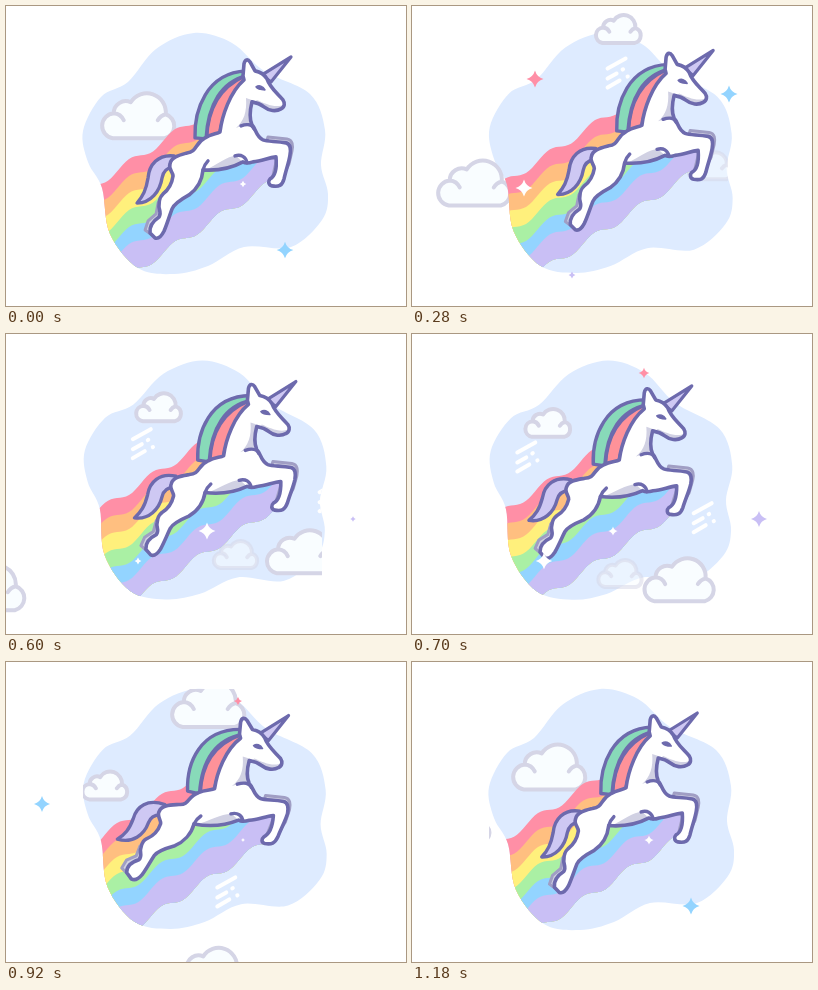
An HTML page with a canvas for the animation above (1200 ms loop, 400 by 300 pixels).

```html
<!DOCTYPE html>
<html lang="en">
<head>
<meta charset="utf-8">
<title>Unicorn</title>
<style>
html, body { margin: 0; width: 100%; height: 100%; overflow: hidden; background: #fff; }
canvas { display: block; width: 400px; height: 300px; }
</style>
</head>
<body>
<canvas id="stage"></canvas>
<script>
const LOOP = 1200, TAU = Math.PI * 2;
const canvas = document.getElementById('stage');
const dpr = window.devicePixelRatio || 1;
canvas.width = 400 * dpr;
canvas.height = 300 * dpr;
const c = canvas.getContext('2d');

const INK = '#6d6aad', SHADE = '#d1d1e3', LILAC = '#cec8f3';
const PINK = '#ff8fa6', BLUE = '#93d4ff', PURPLE = '#c9bff5', WHITE = '#fff';
const RAINBOW = [PINK, '#ffbf80', '#fff07c', '#aaf0a4', BLUE, PURPLE];

const BLOB = [
  [188, 27], [150, 43], [122, 76], [95, 91], [77, 125], [82, 156], [96, 182],
  [104, 228], [132, 262], [168, 268], [202, 260], [238, 241], [285, 241], [316, 214],
  [322, 188], [315, 159], [319, 124], [304, 88], [258, 65], [226, 37]
];

const SHAPE = {
  rainbowEnd: 'M-60 90 L196 104 L225 140 L277 150 L270 182 L275 320 L-60 320 Z',
  tail: 'M168 150 C152 148 143 159 142 172 C140 184 137 190 131 197 C145 197 154 185 156 172 C157 166 161 162 167 161 Z',
  green: 'M189 132 C188 105 200 67 240 65 L240 70 C216 76 202 98 200 133 Z',
  pink: 'M201 133 C202 104 214 82 238 71 L238 80 C226 90 217 105 213 129 Z',
  orange: 'M210 131 C212 112 221 92 238 79 L234 100 L222 128 Z',
  horn: 'M256 69 L285 51 L265 76 Z',
  body: 'M237 70 L238 58 C239 53 242 53 244 56 L249 65 C254 66 258 68 261 73 C264 82 271 87 277 94 ' +
    'C279 97 279 101 275 103 C270 106 263 105 258 101 C254 98 251 97 246 96 C244 104 243 112 246 119 ' +
    'C250 123 250 131 257 134 C262 136 270 135 280 137 C285 138 285 143 284 149 C283 156 280 164 278 173 ' +
    'C276 180 273 181 266 180 C262 179 262 175 264 173 C270 170 271 162 270 151 C262 152 256 155 247 156 ' +
    'C244 157 240 158 237 156 C226 162 212 165 197 164 C196 175 190 184 183 189 C174 194 168 198 166 203 ' +
    'C163 211 161 218 158 225 C155 231 152 233 149 232 L144 227 C143 220 147 215 153 211 ' +
    'C156 206 152 203 153 199 C153 192 155 190 157 188 C162 184 166 177 167 170 C167 166 162 163 164 158 ' +
    'C165 151 174 149 181 147 C191 146 189 137 199 132 C205 128 211 128 214 126 C216 110 224 86 238 74 Z',
  neckShade: 'M249 95 L240 92 C241 106 238 115 230 122 C237 119 244 118 250 124 Z',
  bellyShade: 'M238 157 C226 163 212 166 198 165 C212 158 221 150 230 150 Z',
  jawShade: 'M280 98 C270 103 260 98 251 94 L246 98 L262 107 L278 106 Z',
  lines: 'M229 150 C235 148 240 151 241 157 M197 164 C198 160 200 157 202 155 M235 120 C240 118 246 118 248 123',
  eye: 'M250 81 C253 79 257 80 259 84 C256 84 252 84 250 81 Z',
  farFront: 'M262 131 L281 133 C287 134 287 140 286 145 L283 158 L276 172 L266 174 L271 152 L256 152 Z',
  farHind: 'M159 188 L152 197 L150 208 L142 215 L139 224 L146 229 L157 215 Z'
};

const CLOUD = new Path2D('M14 50 L66 50 A12.5 12.5 0 0 0 67 26 A19 19 0 0 0 32 14 A12 12 0 0 0 15 25 ' +
  'A12.6 12.6 0 0 0 14 50 Z M15 25 A12 12 0 0 1 25 32 M67 26 A13 13 0 0 0 59 32');
const DASHES = new Path2D('M-9 -7 L9 -17 M-9 3 L0 -2 M6 -6 L6.5 -6.3 M-9 12 L3 5 M11 1 L11.2 .9');

// Each cloud passes its lower left corner (x, y) at time "at" and shows within a box
const CLOUDS = [
  { x: 93, y: 134, vx: -.25, vy: .24, size: 1, at: 1200, from: 690, box: [-90, 27, 500, 280] },
  { x: 258, y: 241, vx: -.285, vy: .28, size: .96, at: 600, from: 300, box: [0, 0, 316, 300] },
  { x: 182, y: 38, vx: -.168, vy: .157, size: .62, at: 280, from: 0, box: [77, 0, 323, 300] },
  { x: 206, y: 235, vx: -.215, vy: .19, size: .6, at: 600, from: 100, box: [0, 0, 316, 263], alpha: .5 }
];

// x, y, time of full size, colour
const SPARKS = [
  [237, 178, 1070, WHITE], [279, 244, 1180, BLUE], [123, 73, 270, PINK], [112, 182, 280, WHITE],
  [317, 88, 280, BLUE], [160, 269, 410, PURPLE], [201, 197, 590, WHITE], [347, 185, 740, PURPLE],
  [132, 227, 730, WHITE], [232, 39, 800, PINK], [36, 142, 960, BLUE]
];

// The leap is two harmonics: drift of the whole body, and the swing of its rear
const wave = (a, mean, s1, c1, s2, c2) =>
  mean + s1 * Math.sin(a) + c1 * Math.cos(a) + s2 * Math.sin(2 * a) + c2 * Math.cos(2 * a);

function poser(t) {
  const a = TAU * t / LOOP;
  const dx = wave(a, 4.8, 10.7, -2.5, -6.5, -2.3);
  const dy = wave(a, -2, -5, 1.7, 2, .2);
  const swing = wave(a, .5, -.53, -.275, -.275, -.225);
  const bend = (x, y) => {
    const rear = Math.max(0, (250 - x) / 110), low = Math.max(0, (y - 150) / 80);
    return [x + dx - swing * (7 * rear + 10 * low), y + dy - swing * (14 * rear * rear + 2 * low)]
      .map(v => v.toFixed(2)).join(' ');
  };
  return name => new Path2D(SHAPE[name].replace(/(-?[\d.]+) (-?[\d.]+)/g, (m, x, y) => bend(+x, +y)));
}

function paint(path, fill, stroke, width) {
  if (fill) { c.fillStyle = fill; c.fill(path); }
  if (stroke) { c.strokeStyle = stroke; c.lineWidth = width; c.stroke(path); }
}

// The blob rocks a few degrees and back
function blobPath(t) {
  const turn = .035 * (1 - Math.cos(TAU * t / LOOP)), n = BLOB.length;
  const sin = Math.sin(turn), cos = Math.cos(turn);
  const at = i => {
    const x = BLOB[(i + n) % n][0] - 200, y = BLOB[(i + n) % n][1] - 147;
    return [200 + x * cos - y * sin, 147 + x * sin + y * cos];
  };
  const path = new Path2D();
  path.moveTo(...at(0));
  for (let i = 0; i < n; i++) {
    const [p, q, r, s] = [at(i - 1), at(i), at(i + 1), at(i + 2)];
    path.bezierCurveTo(q[0] + (r[0] - p[0]) / 6, q[1] + (r[1] - p[1]) / 6,
      r[0] - (s[0] - q[0]) / 6, r[1] - (s[1] - q[1]) / 6, ...r);
  }
  return path;
}

function drawCloud({ x, y, vx, vy, size, at, from, box, alpha = 1 }, t) {
  const age = (t < from ? t + LOOP : t) - at;
  c.save();
  c.beginPath();
  c.rect(...box);
  c.clip();
  c.globalAlpha = alpha;
  c.translate(x + vx * age, y + vy * age);
  c.scale(size, size);
  c.translate(0, -52);
  paint(CLOUD, '#f9fdff', '#d5d5e6', 4 / size);
  c.restore();
}

function drawDashes(x, y) {
  c.save();
  c.translate(x, y);
  paint(DASHES, null, WHITE, 4);
  c.restore();
}

function drawRainbow(t, end) {
  const edge = x => 139.5 - .65 * (x - 150) + 4 * Math.sin(TAU * (x / 45 + 3 * t / LOOP));
  c.save();
  c.clip(end);
  RAINBOW.forEach((color, i) => {
    c.beginPath();
    for (let x = 60; x <= 320; x += 3) c.lineTo(x, edge(x) + i * 17);
    for (let x = 320; x >= 60; x -= 3) c.lineTo(x, edge(x) + 112);
    c.fillStyle = color;
    c.fill();
  });
  c.restore();
}

function drawUnicorn(posed) {
  paint(posed('farFront'), SHADE, '#a09ec4', 3);
  paint(posed('farHind'), SHADE, '#a09ec4', 3);
  paint(posed('tail'), LILAC, INK, 3.4);
  paint(posed('orange'), '#fec983', INK, 2.4);
  paint(posed('pink'), '#fe9299', INK, 2.6);
  paint(posed('green'), '#88dab9', INK, 3.4);
  paint(posed('horn'), LILAC, INK, 3.2);
  const body = posed('body');
  paint(body, WHITE);
  c.save();
  c.clip(body);
  for (const part of ['neckShade', 'bellyShade', 'jawShade']) paint(posed(part), SHADE);
  c.restore();
  paint(body, null, INK, 3.6);
  paint(posed('lines'), null, INK, 3.4);
  paint(posed('eye'), INK, INK, 1.5);
}

function drawSpark([x, y, peak, color], t) {
  const gap = Math.abs(t - peak), d = Math.min(gap, LOOP - gap), life = 175;
  if (d >= life) return;
  const r = 8.5 * Math.cos(d / life * Math.PI / 2), q = r * .22;
  c.beginPath();
  c.moveTo(x, y - r);
  c.quadraticCurveTo(x + q, y - q, x + r, y);
  c.quadraticCurveTo(x + q, y + q, x, y + r);
  c.quadraticCurveTo(x - q, y + q, x - r, y);
  c.quadraticCurveTo(x - q, y - q, x, y - r);
  c.fillStyle = color;
  c.fill();
}

function draw(t) {
  c.setTransform(dpr, 0, 0, dpr, 0, 0);
  c.fillStyle = WHITE;
  c.fillRect(0, 0, 400, 300);
  c.lineJoin = c.lineCap = 'round';
  const blob = blobPath(t), posed = poser(t);
  paint(blob, '#deebff');
  for (const cloud of CLOUDS) drawCloud(cloud, t);
  c.save();
  c.clip(blob);
  drawDashes(136 - .215 * (t - 600), 112 + .133 * (t - 600));
  drawDashes(259 - .32 * (t - 800), 207 + .21 * (t - 800));
  drawRainbow(t, posed('rainbowEnd'));
  c.restore();
  drawUnicorn(posed);
  for (const spark of SPARKS) drawSpark(spark, t);
}

const start = performance.now();
function tick() {
  draw((performance.now() - start) % LOOP);
  requestAnimationFrame(tick);
}
tick();
</script>
</body>
</html>
```
